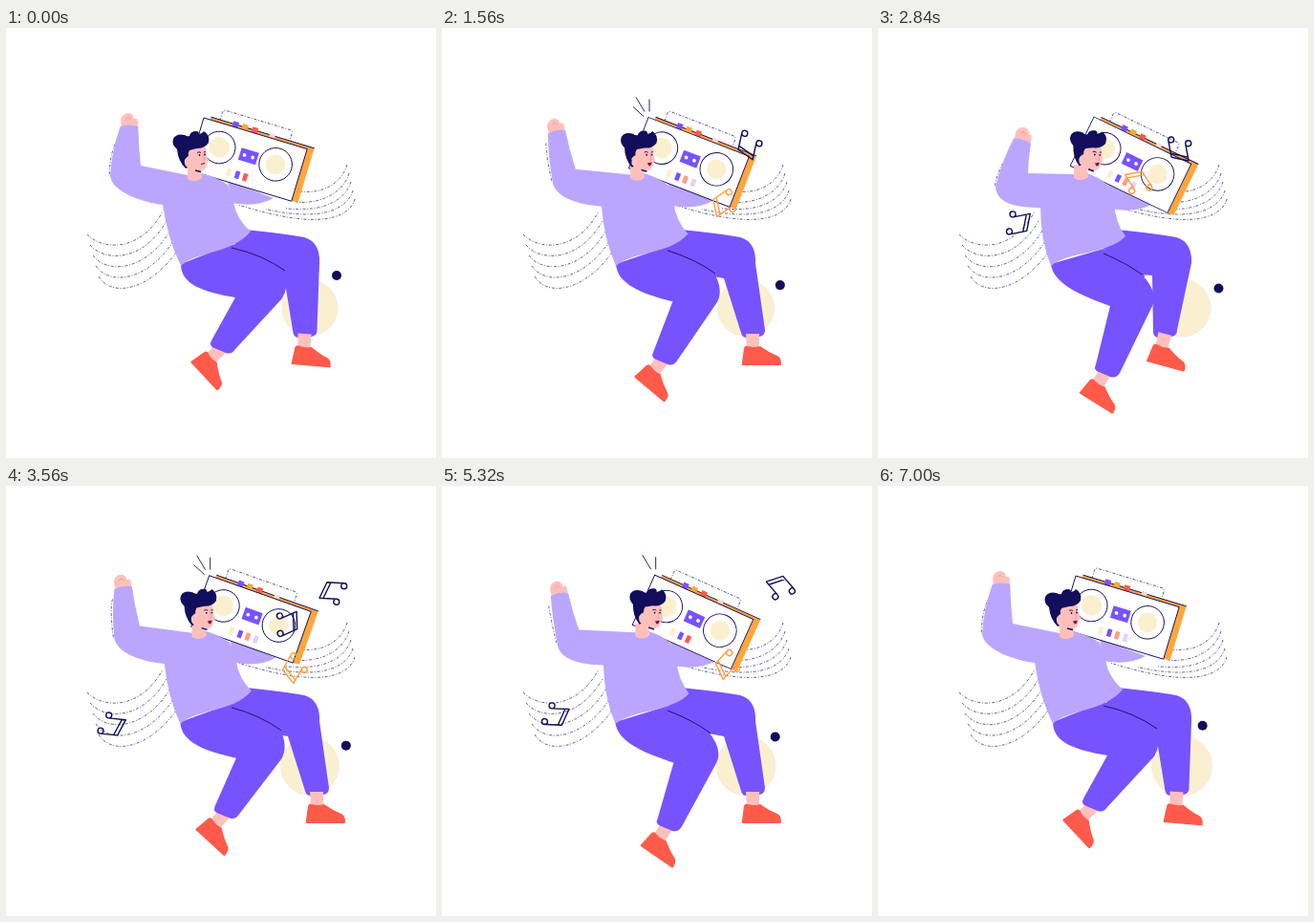
Write an HTML page that moves like this. It is 450 px wide and 450 px high and loops after 7040 ms.

```html
<!DOCTYPE html>
<html lang="en">
<head>
<meta charset="utf-8">
<title>Boombox dance</title>
<style>
  html, body { margin: 0; width: 100%; height: 100%; overflow: hidden; background: #fff; }
  svg { display: block; width: 100%; height: 100%; }
  .line { fill: none; stroke: #120e5b; stroke-width: .9; }
  .dots { stroke-width: .65; stroke-dasharray: 3 1.6 1 1.8; }
  .lilac { fill: #bba6ff; }
  .pants { fill: #7653ff; }
  .navy { fill: #120e5b; }
  .skin { fill: #ffc0bc; }
  .blush { fill: none; stroke: #f58f93; stroke-width: .7; }
  .red { fill: #ff5a4a; }
  .orange { fill: #ffa63c; }
  .cream { fill: #faf0cf; }
  .note { fill: none; stroke-width: 1.4; stroke-linejoin: round; }
</style>
</head>
<body>
<svg viewBox="0 0 450 450">
  <path id="waves" class="line dots"/>
  <circle id="disc" class="cream" cx="318" cy="293" stroke="#f6dfe0" stroke-width=".6"/>
  <circle id="dot" class="navy" r="5"/>
  <g id="backNotes"></g>

  <path id="farArm" class="lilac"/>
  <g id="box">
    <path class="line dots" d="M17-2V-11Q17-14 20-14H90Q93-14 93-11V-2"/>
    <path class="orange" d="M7-3H120V56L113 57V0H7Z"/>
    <path class="line" d="M7-3H120"/>
    <rect class="pants" x="31" y="-6" width="6" height="6"/>
    <rect class="orange" x="41" y="-6" width="6" height="6"/>
    <rect class="red" x="52" y="-6" width="6" height="6"/>
    <rect x="71" y="-5" width="6" height="4" fill="#fbdcd8"/>
    <rect class="line" width="113" height="57" style="fill:#fff"/>
    <g class="line"><circle cx="24.5" cy="25" r="16.8"/><circle cx="86" cy="25" r="17.3"/></g>
    <g class="cream"><circle cx="24.5" cy="25" r="10.8"/><circle cx="86" cy="25" r="10.3"/></g>
    <rect class="pants" x="47" y="18.5" width="19" height="13"/>
    <g fill="#fff"><circle cx="52" cy="25" r="1.9"/><circle cx="61" cy="25" r="1.9"/></g>
    <rect class="cream" x="39" y="43" width="4.6" height="8"/>
    <rect class="pants" x="48.5" y="43" width="4.6" height="8"/>
    <rect id="lamp3" x="57" y="43" width="4.6" height="8"/>
    <rect id="lamp4" x="66" y="43" width="4.6" height="8" fill="#ddd2ff"/>
  </g>
  <path id="rays" class="line"/>

  <path id="rightLeg" class="pants"/>
  <g id="rightFoot"></g>
  <g id="leftFoot"></g>
  <path id="leftLeg" class="pants"/>
  <path id="seam" class="line"/>

  <g id="hand">
    <path class="skin" d="M-8 2L-9-7Q-7-14-1-14Q4-14 5-8L8-8Q10-3 8 2Z"/>
    <path class="blush" d="M-4-8Q0-11 2-7"/>
  </g>
  <path id="armDots" class="line dots"/>
  <path id="torso" class="lilac"/>
  <path id="neck" class="skin" d="M190 144L204 146L205 157Q198 163 190 158Z"/>
  <g id="head">
    <path class="skin" d="M187 130L206 122Q210 126 210 133L212 139L210 141Q210 149 203 150Q195 151 188 146Z"/>
    <path class="line" d="M198 149L204 150.500" style="stroke-width:1.500"/>
    <path class="navy" d="M188 147Q180 139 179 127Q173 122 175 116Q178 110 187 112Q190 114 192 113Q193 108 199 108Q202 108 202 111Q205 111 207 108Q214 112 212 120Q208 126 200 126L192 128Q190 131 191 134Q186 137 187 141Q187 144 190 146Z"/>
    <path class="line" d="M200 130.500Q202 129 204 130.500M207 130L209 129.500"/>
    <g class="navy"><circle cx="202.5" cy="133" r=".9"/><circle cx="208" cy="132.5" r=".9"/></g>
    <path class="blush" d="M206 132L208 138L205.500 138"/>
    <path id="calm" class="line" d="M204 142.500L208 141.500"/>
    <path id="smile" d="M204 141.500L208.500 140.500Q208.500 144.500 206 144.500Q204.500 143.500 204 141.500Z" fill="#7a1848"/>
  </g>
  <g id="frontNotes"></g>
</svg>
<script>
const LOOP = 7040, STEP = 40, BEAT = 480, ACCENT = 920;
const FOOT = `<path class="skin" d="M-7-1L7-1L7 16L-6 16Z"/>
  <path class="red" d="M-9 14Q-8 11-5 12Q2 14 8 12Q18 19 26 22Q30 24 30 31Q30 32 28 32H-10Q-12 32-11 29Z"/>`;

const el = id => document.getElementById(id);
const set = (id, name, value) => el(id).setAttribute(name, value);
const show = (node, on) => node.setAttribute("visibility", on ? "visible" : "hidden");
const lerp = (a, b, p) => a + (b - a) * p;
const ease = p => (1 - Math.cos(Math.PI * Math.max(0, Math.min(1, p)))) / 2;
const place = (id, x, y, turn) => set(id, "transform", `translate(${x} ${y})rotate(${turn})`);

// Note streams: each note drifts and spins evenly from one end to the other
const streams = [
  { color: "#120e5b", layer: "frontNotes", first: 640, gap: 1440, count: 3, life: 1840,
    from: [293, 142], to: [353, 106], turn: 60, spin: 265 },
  { color: "#ff9d3c", layer: "frontNotes", first: 680, gap: 1840, count: 3, life: 2040,
    from: [255, 148], to: [349, 236], turn: 20, spin: -335 },
  { color: "#120e5b", layer: "backNotes", first: 2040, gap: 1920, count: 2, life: 1700,
    from: [187, 150], to: [103, 260], turn: 60, spin: 40 }
];

function addNote(stream) {
  const node = document.createElementNS("http://www.w3.org/2000/svg", "path");
  const head = "a3 3 0 1 0-6 0a3 3 0 1 0 6 0";
  node.setAttribute("class", "note");
  node.setAttribute("stroke", stream.color);
  node.setAttribute("d", `M-5 5V-13L12-6V12M-5-9L12-2M-5 5${head}M12 12${head}`);
  el(stream.layer).append(node);
  return node;
}

function drawNotes(t) {
  for (const { nodes, first, gap, life, from, to, turn, spin } of streams) {
    nodes.forEach((node, i) => {
      const u = (t - first - gap * i) / life;
      show(node, u >= 0 && u < 1);
      const x = lerp(from[0], to[0], u), y = lerp(from[1], to[1], u);
      node.setAttribute("transform", `translate(${x} ${y})rotate(${turn + spin * u})`);
    });
  }
}

function drawWaves() {
  let d = "";
  for (let i = 0; i < 5; i++) {
    d += `M${85 + 3 * i} ${216 + 11 * i}C${100 + 2.5 * i} ${232 + 12.5 * i} ${140 + 2.5 * i} ${236 + 10 * i} ${164 + 4 * i} ${192 + 10 * i}`;
    d += `M${357 + 2 * i} ${143 + 9 * i}C${352 + 2 * i} ${160 + 9 * i} 335 ${174 + 10 * i} ${308 - 4 * i * i} ${171 + 14 * i - 2.6 * i * i}`;
  }
  set("waves", "d", d);
}

// m blends a value between leaning left and leaning right
function drawArm(m, s, swing) {
  const x = m(129, 151) + swing, y = m(103, 118) + swing * .08;
  const turn = s * 15 + swing * .9, tilt = turn * Math.PI / 180;
  const dx = 9.3 * Math.cos(tilt), dy = 9.3 * Math.sin(tilt);
  const ex = m(109, 123), ey = m(155, 166);
  const ix = m(141, 157) + swing * .45, iy = m(144, 152);
  const midX = (x - dx + ex) / 2 - 4 - swing * .1, midY = (y + ey) / 2;
  set("torso", "d", `M${x - dx} ${y - dy}Q${midX} ${midY} ${ex} ${ey}
    C${m(111, 124)} ${m(172, 184)} 145 ${m(183, 188)} ${m(164, 170)} ${m(185, 188)}
    Q${m(169, 170)} ${m(220, 222)} ${m(183, 181)} 249
    C${m(199, 201)} 233 ${m(236, 241)} 237 ${m(256, 259)} ${m(213, 218)}
    Q${m(241, 248)} ${m(200, 203)} ${m(238, 247)} 182L${m(232, 240)} 164Q${m(220, 232)} 156 ${m(205, 218)} 152
    L${m(190, 205)} ${m(154, 153)}L${ix} ${iy}Q${(ix + x + dx) / 2 - 1} ${(iy + y) / 2} ${x + dx} ${y + dy}Q${x} ${y - 3} ${x - dx} ${y - dy}Z`);
  set("armDots", "d", `M${x - dx - 2} ${y + 12}Q${midX - 2} ${midY} ${ex - .8} ${ey}`);
  place("hand", x, y, turn);
}

function drawLegs(m, s, kick) {
  const ax = m(224, 237), ay = m(336, 361);
  set("leftLeg", "d", `M${m(183, 181)} 247C183 268 ${m(205, 215)} ${m(276, 281)} ${m(240, 243)} ${m(282, 291)}
    L${ax - 9} ${ay - 9}q-3 6 3 8l12 5q6 2 10-4L${m(289, 287)} ${m(283, 291)}
    Q${m(296, 293)} ${m(272, 277)} ${m(292, 278)} ${m(255, 260)}Q260 ${m(234, 244)} 236 ${m(226, 231)}Z`);
  set("seam", "d", `M236 ${m(230, 236)}Q${m(268, 262)} ${m(237, 247)} ${m(292, 279)} ${m(254, 260)}`);
  place("leftFoot", ax, ay, m(47, 32));

  const fx = lerp(300, 325, kick), fy = 321;
  set("rightLeg", "d", `M250 211Q290 215 312 219Q329 224 328 246L${fx + 13} ${fy - 5}q0 6-6 7l-13 1q-5 0-6-5
    L${lerp(287, 295, kick)} ${lerp(259, 262, kick)}L274 258L236 231Z`);
  place("rightFoot", fx, fy, 15 * (1 - kick) ** 1.6);
}

function draw(t) {
  const active = ease(t / 300) * (1 - ease((t - 6200) / 280));
  const pulse = Math.cos(2 * Math.PI * (t - ACCENT) / BEAT);
  const sway = Math.cos(Math.PI * (t - ACCENT) / BEAT);
  const s = active * (.65 + .35 * pulse);
  const m = (a, b) => lerp(a, b, s);
  const phase = t % BEAT;

  set("farArm", "d", `M${m(232, 240)} 160L${m(280, 288)} ${m(178, 184)}q-18 10-44 5Z`);
  drawLegs(m, s, lerp(.5, 1 - Math.max(0, sway) ** 1.5, active));
  drawArm(m, s, active * 13 * (sway - 1));

  const bx = m(207, 226), by = m(94, 93);
  place("box", bx, by, m(16.8, 25.8));
  place("rays", bx, by, 0);
  place("neck", 15 * s, -s, 0);
  set("head", "transform", `translate(${22 * s} ${-s})rotate(${8 * s} 200 150)`);

  const calm = t < 1000;
  show(el("calm"), calm);
  show(el("smile"), !calm);
  set("lamp3", "fill", phase < 120 ? "#ff5a4a" : "#ff9d86");
  show(el("lamp4"), phase >= 120);
  set("rays", "d", "M-13-21L-4-6M1-19V-6" + (t < LOOP / 2 + 100 ? "M-16-11L-5-1" : ""));
  show(el("rays"), t > 40 && t < 6600 && phase >= 40 && phase <= 400);

  const drift = Math.sin(Math.PI * t / 5800);
  set("dot", "cx", 346 + 10.5 * drift);
  set("dot", "cy", 259 + 13.5 * drift);
  set("disc", "r", lerp(29, 31.5, t / LOOP));
  drawNotes(t);
}

for (const id of ["leftFoot", "rightFoot"]) el(id).innerHTML = FOOT;
for (const stream of streams) stream.nodes = Array.from({ length: stream.count }, () => addNote(stream));
drawWaves();

const begin = performance.now();
function tick() {
  const t = Math.max(0, performance.now() - begin) % LOOP;
  draw(Math.floor(t / STEP) * STEP);
  requestAnimationFrame(tick);
}
tick();
</script>
</body>
</html>
```
